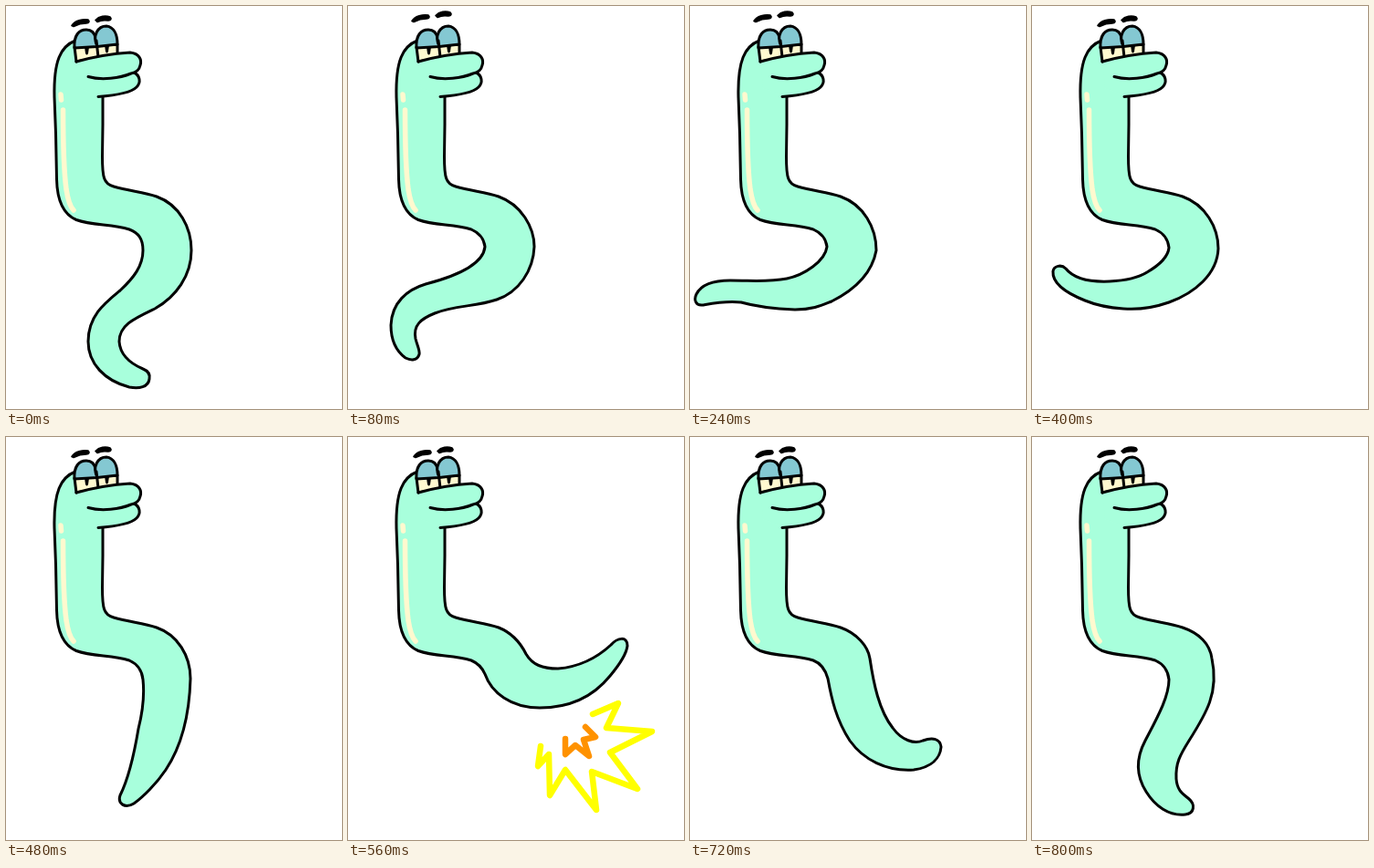
These frames come from a looping animation (368 by 442 pixels, 0.88 s). An HTML page:

```html
<!DOCTYPE html>
<html lang="en">
<head>
<meta charset="utf-8">
<title>Tail whip</title>
<style>
  html, body { margin: 0; height: 100%; overflow: hidden; background: #fff; }
  svg { display: block; width: 100vw; height: 100vh; }
  .ink { stroke: #000; stroke-width: 3; stroke-linecap: round; stroke-linejoin: round; }
  .skin { fill: #a8ffdc; }
  .line { fill: none; }
  .lid { fill: #84c8d2; }
  .cream { fill: #fff9cf; }
  .shine { fill: none; stroke: #fff9cf; stroke-width: 5.5; stroke-linecap: round; }
  .spark { fill: none; stroke-width: 6.5; stroke-linecap: round; stroke-linejoin: round; }
  #brows { stroke: #000; stroke-width: 1.6; stroke-linejoin: round; }
</style>
</head>
<body>
<svg viewBox="0 0 368 442">
  <g id="burst">
    <path class="spark" stroke="#ff0" d="M268 304L296 292L283 319L333 323L287 346L317 386L267 367L272 409L238 365L221 393L220 348L208 361L211 339"/>
    <path class="spark" stroke="#ff9200" d="M260 318L271 329L258 332L264 350L249 338L238 348L238 331"/>
  </g>
  <path id="body" class="ink skin"/>
  <path class="shine" d="M60 97L60.500 103M62.500 114C62.500 150 63 178 66 201C68 214 70 220 74 224"/>

  <path class="skin" d="M75 39L78 62L136 52L147 64L138 74L145 80L140 92L104 99L80 90Z"/>
  <path class="ink cream" d="M75 45L77 61L122 53L122 42Z"/>
  <path class="ink lid" d="M75 46C74 32 80 26 88 26C94 26 97 30 98 35L100 44.500Z"/>
  <path class="ink lid" d="M100 44.500C94 32 101 22 110 22C118 23 122 31 122 42Z"/>
  <path class="ink line" d="M99 38L101 56"/>
  <path d="M86 45H91L90 52Q88.500 55 87 52ZM108 43H113L112 50Q110.500 53 109 50Z"/>
  <path class="ink skin" d="M140 73C147 76 148 84 143 89C137 95 120 98 101 99.500"/>
  <path class="ink skin" d="M77 61C95 56 120 52 136 51C146 52 149 59 147 65C146 70 142 73 137 74C125 79 105 82 90 77.500"/>
  <g id="brows">
    <path d="M72 21.500C75 16 84 14 90 15C92 17 91 19 88 19C82 19 77 21 74 22.500Z"/>
    <path d="M98 15.500C102 11 109 10 114 12C116 14 115 16 112 16C107 15 103 16 100 17.500Z"/>
  </g>
</svg>
<script>
const STEP = 80;
const COUNT = 11;
const get = id => document.getElementById(id);
const body = get('body'), burst = get('burst'), brows = get('brows');

// Each tail runs from the outer bend, round the tip, to the inner bend.
const tail = {
  curl: 'C190 218 203 243 203 268C203 296 186 319 163 332C140 343 124 350 124 368C125 383 136 392 150 398C155 400 158 404 157 409C156 418 146 420 135 418C108 411 90 392 90 368C90 340 108 326 125 312C140 298 150 285 150 268C150 255 145 249 135 245',
  low: 'C190 218 204 243 204 264C203 290 187 314 163 322C140 330 117 328 95 337C80 343 71 350 74 365C76 373 79 378 78 382C76 389 69 389 63 386C52 378 47 366 47 350C48 325 65 311 85 305C112 298 148 285 150 264C149 256 144 249 135 245',
  flat: 'C190 218 204 243 204 268C200 290 185 309 155 324C145 328 135 333 115 333C90 332 70 329 56 325C40 323 25 326 14 328C6 329 4 322 7 316C12 306 25 301 44 301C70 301 85 303 106 299C125 295 148 280 150 264C149 256 144 249 135 245',
  cocked: 'C190 218 204 243 204 266C203 294 178 315 150 325C130 332 112 333 100 332C85 331 70 328 58 323C38 315 22 305 23 291C24 285 32 283 37 288C45 298 62 303 85 302C105 301 118 297 126 292C138 285 149 276 150 265C149 256 144 249 135 245',
  swing: 'C188 217 202 240 202 265C201 300 195 335 175 365C165 380 150 395 140 402C130 408 122 402 125 393C134 375 140 350 145 320C150 300 152 285 150 266C149 256 144 249 135 245',
  lash: 'C180 215 189 226 195 238C202 250 213 254 230 254C255 252 275 240 288 228C295 220 306 218 306 229C305 238 297 250 287 262C270 283 245 297 210 297C178 297 157 280 150 260C147 253 142 248 135 245',
  drop: 'C182 215 195 229 197 243C201 270 207 300 222 319C232 333 246 337 255 333C266 329 274 331 275 340C274 352 265 362 245 365C215 367 190 354 175 333C160 310 155 287 151 265C148 254 143 248 135 245',
  hang: 'C183 215 195 227 197 243C205 280 191 303 172 333C162 349 157 358 158 375C159 388 165 391 172 397C179 403 178 413 168 414C150 416 135 405 125 389C113 370 115 350 124 333C137 308 150 285 150 266C149 256 144 249 135 245'
};

function mix(a, b, k) {
  const to = b.match(/\d+/g);
  let i = 0;
  return a.replace(/\d+/g, n => (+n + (to[i++] - n) * k).toFixed(1));
}

const { curl, low, flat, cocked, swing, lash, drop, hang } = tail;
const poses = [
  curl, low, mix(low, flat, 0.5), flat, mix(flat, cocked, 0.5), cocked,
  swing, lash, mix(lash, drop, 0.5), drop, hang
];
const lift = [0, 1, 1, 1, 0.5];

function draw(step) {
  body.setAttribute('d',
    'M106 99L106 130L105.5 165C105.5 188 107 195 118 198C135 203 150 204 165 209' +
    poses[step] +
    'C115 239 95 241 77 234.5C64 229 56 214 55.5 190L54.5 140L53 100C52 60 60 44 76 38');
  const up = lift[step] || 0;
  brows.setAttribute('transform', `translate(${-2 * up} ${-5 * up})`);
  burst.style.display = step === 7 || step === 8 ? '' : 'none';
  burst.setAttribute('transform',
    step === 8 ? 'translate(215 313) scale(1.22) translate(-215 -313)' : '');
}

function tick() {
  draw(Math.floor(performance.now() / STEP) % COUNT);
  requestAnimationFrame(tick);
}
tick();
</script>
</body>
</html>
```
